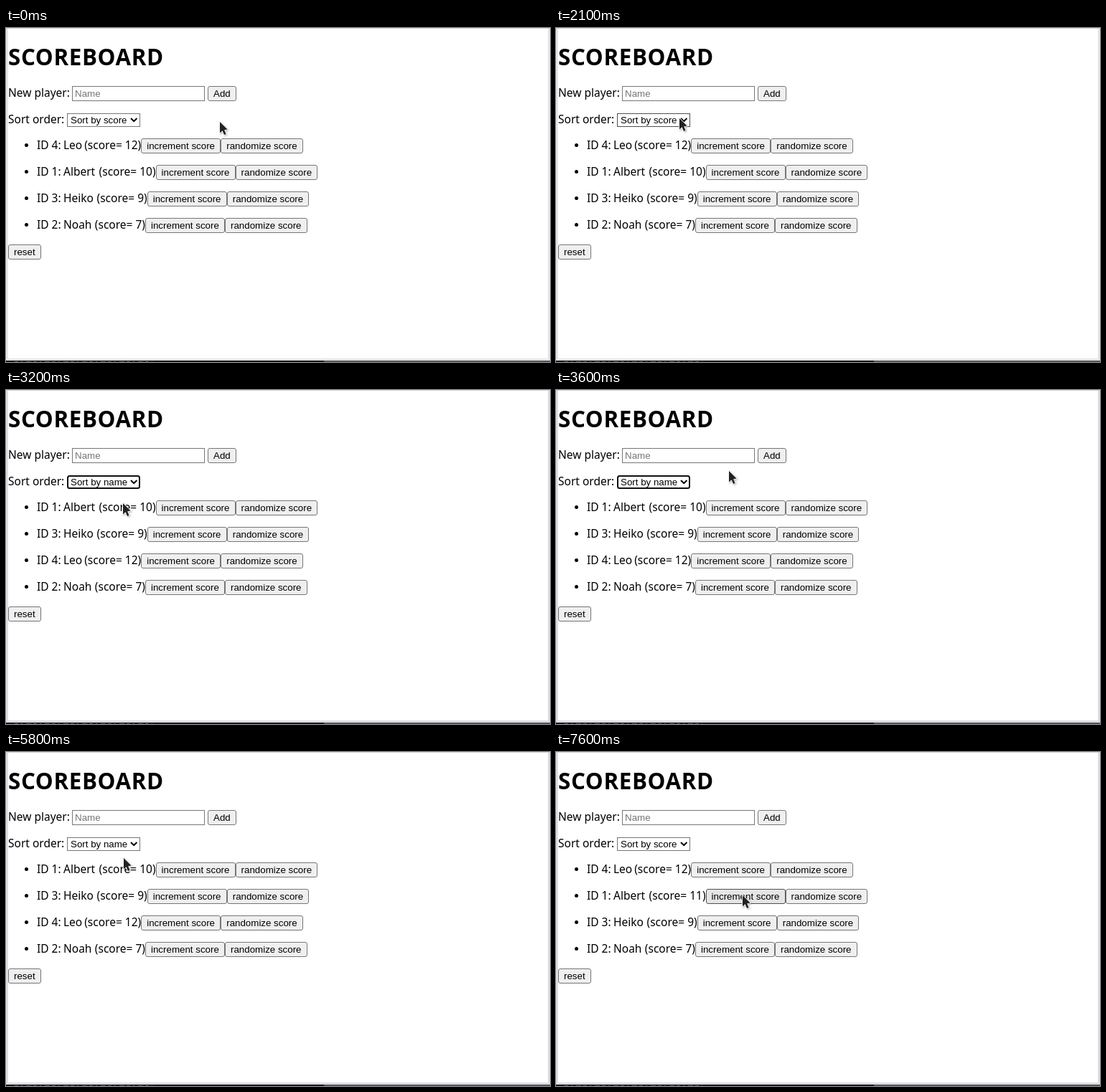
These frames come from a looping animation (758x466 px, 8 s). An HTML page:

```html
<!DOCTYPE html>
<html lang="en">
<head>
<meta charset="utf-8">
<title>Scoreboard</title>
<style>
  html, body { margin: 0; width: 100%; height: 100%; overflow: hidden; background: #fff; }
  svg { display: block; width: 758px; height: 466px; }
  text { font: 15.5px "Noto Sans", "Open Sans", sans-serif; white-space: pre; }
  .title { font-size: 31.3px; font-weight: 700; letter-spacing: .65px; }
  .ui { font: 13.333px "Liberation Sans", Arial, sans-serif; }
  .popup { filter: drop-shadow(0 3px 5px rgba(0, 0, 0, .45)); }
  .pointer { fill: #222; stroke: #fff; stroke-width: 1.6; paint-order: stroke;
    filter: drop-shadow(1px 1px 1px rgba(0, 0, 0, .3)); }
</style>
</head>
<body>
<svg id="stage" viewBox="0 0 758 466"></svg>
<script>
const LOOP = 8000, STEP = 100, MOVE = 300;
const ROW = 37, BUTTON = 21;

const players = [
  { id: 4, name: 'Leo', score: 12, x: 188.2 },
  { id: 1, name: 'Albert', score: 10, x: 208.6 },
  { id: 3, name: 'Heiko', score: 9, x: 196.7 },
  { id: 2, name: 'Noah', score: 7, x: 194 }
];
const sorters = {
  score: (a, b) => b.score - a.score,
  name: (a, b) => a.name < b.name ? -1 : 1
};

// Pointer stops: arrival time, x, y
const stops = [
  [0, 298, 131], [100, 295, 130], [1400, 251, 138], [1600, 201, 140],
  [2100, 172, 126], [2600, 162, 148], [2800, 163, 158], [3600, 241, 113],
  [4500, 186, 128], [4800, 183, 126], [5100, 164, 148], [6200, 297, 88],
  [6900, 262, 186], [7200, 259, 208], [7400, 260, 200]
];

const stage = document.getElementById('stage');
const between = (t, a, b) => t >= a && t < b;

// The pointer rests at a stop, then glides so that it reaches the next one on time.
function pointerAt(t) {
  const next = stops.findIndex(s => s[0] > t);
  const [t0, x0, y0] = stops.at(next < 0 ? -1 : next - 1);
  if (next < 0) return { x: x0, y: y0 };
  const [t1, x1, y1] = stops[next];
  const u = Math.max(0, 1 - (t1 - t) / Math.min(MOVE, t1 - t0));
  const e = u * u * (3 - 2 * u);
  return { x: Math.round(x0 + (x1 - x0) * e), y: Math.round(y0 + (y1 - y0) * e) };
}

const text = (x, y, s, attrs = '') => `<text x="${x}" y="${y}" ${attrs}>${s}</text>`;
const ui = (x, y, s, attrs = '') => text(x, y, s, 'class="ui" ' + attrs);
const fill = (x, y, w, h, color) =>
  `<rect x="${x}" y="${y}" width="${w}" height="${h}" fill="${color}"/>`;
const box = (x, y, w, h, color, stroke, r = 0) =>
  `<rect x="${x + .5}" y="${y + .5}" width="${w - 1}" height="${h - 1}" rx="${r}" fill="${color}" stroke="${stroke}"/>`;

function scene(t) {
  const open = between(t, 2300, 3200) || between(t, 4700, 5800);
  const ring = between(t, 3200, 4700) || between(t, 6000, 7600);
  const sort = between(t, 3200, 6000) ? 'name' : 'score';
  const p = pointerAt(t);
  const over = (x, y, w, h) =>
    !open && between(p.x, x, x + w) && between(p.y, y, y + h);
  const border = hot => hot ? '#4f4f4f' : '#767676';

  const button = (x, y, w, label) => {
    const left = Math.round(x), width = Math.round(x + w) - left;
    const hot = over(left, y, width, BUTTON);
    return box(left, y, width, BUTTON, hot ? '#e5e5e5' : '#efefef', border(hot), 2.5) +
      ui(x + 8, y + 15, label);
  };

  const row = ({ id, name, score, x }, i) => {
    const y = 169 + ROW * i;
    const points = id === 1 && t >= 7600 ? score + 1 : score;
    return `<circle cx="28.5" cy="${y - 5.5}" r="2.5"/>` +
      text(43, y, `ID ${id}:`) + text(80, y, name) +
      text(x, y, `(score= ${points})`, 'text-anchor="end"') +
      button(x, y - 15, 111, 'increment score') +
      button(x + 111, y - 15, 114.6, 'randomize score');
  };

  const select = () =>
    (ring
      ? '<rect x="86" y="120" width="100" height="17" rx="2.5" fill="#fff" stroke="#101010" stroke-width="2"/>'
      : box(85, 119, 102, 19, '#fff', border(over(85, 119, 102, 19)))) +
    ui(90, 133, 'Sort by ' + sort) +
    '<path d="M174 126l4.2 4.2 4.2-4.2" fill="none" stroke="#000" stroke-width="2"/>';

  const popup = () => {
    const active = p.y < 138 ? sort : p.y < 156 ? 'score' : 'name';
    const option = (name, i) => {
      const on = name === active, y = 138 + 17.5 * i;
      return (on ? fill(86, Math.round(y), 100, 17.5, '#0090ff') : '') +
        ui(90, 151 + 17 * i, 'Sort by ' + name, on ? 'fill="#fff"' : '');
    };
    return '<g class="popup">' + box(85, 137, 102, 37, '#f8f8f8', '#808080') + '</g>' +
      Object.keys(sorters).map(option).join('');
  };

  return fill(0, 0, 758, 466, t < 2300 ? '#e6e6ea' : '#dddde5') +
    fill(3, 0, 752, 461, '#fff') + fill(0, 0, 758, 1, '#d2d2d4') +
    fill(0, 464, 443, 2, '#17191f') + fill(443, 464, 315, 2, '#5d5258') +
    '<path d="M12 465.5H204" stroke="#3f628a" stroke-dasharray="5 4 2 5 7 3"/>' +
    text(3, 52, 'SCOREBOARD', 'class="title"') +
    text(3, 96, 'New player:') +
    box(92, 81, 185, 21, '#fff', '#767676') +
    ui(96, 96, 'Name', 'fill="#757575"') +
    button(281, 81, 40, 'Add') +
    text(3, 133, 'Sort order:') + select() +
    [...players].sort(sorters[sort]).map(row).join('') +
    button(3, 302, 46, 'reset') +
    (open ? popup() : '') +
    `<path class="pointer" transform="translate(${p.x} ${p.y})"
      d="M0 0V15.5L3.6 12.2L6 18L8.6 16.9L6.2 11.2L10.6 10.6Z"/>`;
}

let shown = -1;
function tick() {
  const t = Math.floor(performance.now() % LOOP / STEP) * STEP;
  if (t !== shown) stage.innerHTML = scene(shown = t);
  requestAnimationFrame(tick);
}
tick();
</script>
</body>
</html>
```
